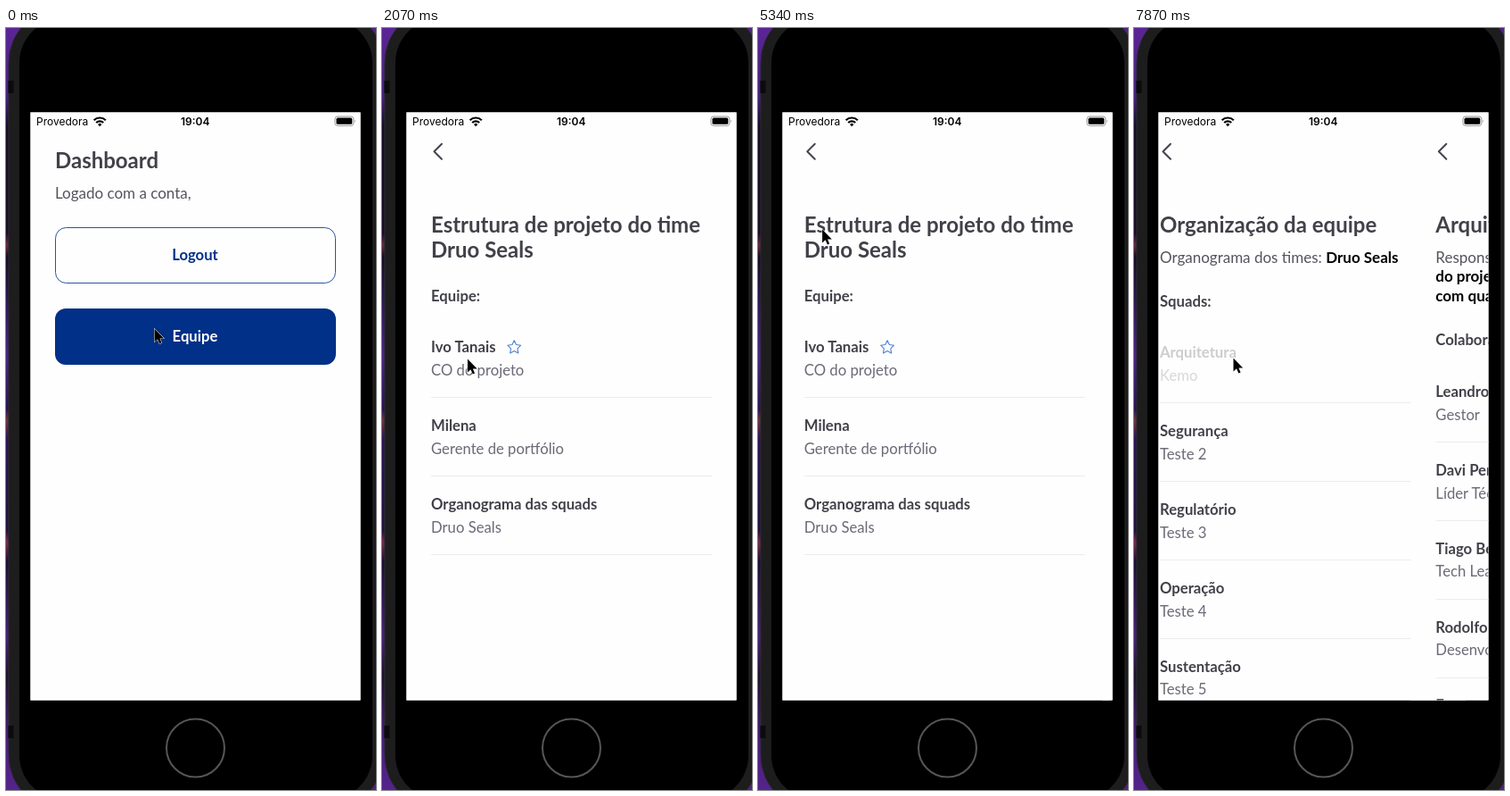
Recreate the animation shown at these times as an HTML page. Size 415 px wide and 853 px high, loop 8 s.

```html
<!DOCTYPE html>
<html lang="pt-BR">
<head>
<meta charset="utf-8">
<title>App em celular</title>
<style>
  html, body { margin: 0; width: 100%; height: 100%; overflow: hidden; background: #000; }
  svg { display: block; width: 100%; height: 100%; }
  text { font: 400 16.7px Lato, "Open Sans", sans-serif; fill: #6c6a77; }
  .h { font-size: 24px; font-weight: 700; fill: #434049; }
  .b { font-weight: 700; fill: #434049; }
  .p { font-size: 17px; fill: #55535f; }
  .k { fill: #000; }
  .kb { font-weight: 700; fill: #000; }
  .btn { font-weight: 700; fill: #003087; text-anchor: middle; }
  .bar { font: 400 12px Inter, Roboto, sans-serif; fill: #000; }
  .clock { font-weight: 600; text-anchor: middle; }
  .line { stroke: #ececee; }
  .chev { fill: none; stroke: #45434e; stroke-width: 2; stroke-linecap: round; stroke-linejoin: round; }
</style>
</head>
<body>
<svg id="stage" viewBox="0 0 415 853">
  <defs>
    <linearGradient id="desk" x2="0" y2="1">
      <stop offset="0" stop-color="#5b2596"/>
      <stop offset=".09" stop-color="#4a1f80"/>
      <stop offset=".13" stop-color="#170c26"/>
      <stop offset=".27" stop-color="#1b0d2a"/>
      <stop offset=".285" stop-color="#6b2a44"/>
      <stop offset=".3" stop-color="#160c24"/>
      <stop offset=".43" stop-color="#4b2488"/>
      <stop offset=".5" stop-color="#2a1350"/>
      <stop offset=".515" stop-color="#6d3340"/>
      <stop offset=".54" stop-color="#2c1452"/>
      <stop offset=".66" stop-color="#24103f"/>
      <stop offset=".675" stop-color="#7a2c4c"/>
      <stop offset=".7" stop-color="#1d0d33"/>
      <stop offset=".8" stop-color="#4a2078"/>
      <stop offset=".85" stop-color="#20102f"/>
      <stop offset=".94" stop-color="#4c1f80"/>
      <stop offset="1" stop-color="#54238c"/>
    </linearGradient>
    <clipPath id="glass"><rect x="27.5" y="94.5" width="370" height="658"/></clipPath>
  </defs>
  <rect width="415" height="853" fill="url(#desk)"/>
  <rect x="400" width="15" height="853" fill="#57218c"/>
  <rect x="3" y="-23" width="420" height="899" rx="62" fill="#1d1d1e" stroke="#2c2c2e"/>
  <path d="M2.5 59h6v14h-6zM2.5 781h6v14h-6z" fill="#0b0b0c"/>
  <rect x="15" y="-11" width="396" height="875" rx="50" fill="#000"/>
  <circle cx="212.5" cy="806" r="32.5" fill="none" stroke="#565656" stroke-width="2"/>
  <g clip-path="url(#glass)">
    <rect x="27" y="94" width="371" height="659" fill="#fefefe"/>
    <g id="screens"></g>
    <rect x="27" y="94" width="371" height="22" fill="#fefefe"/>
    <text class="bar" x="34" y="109">Provedora</text>
    <g fill="none" stroke="#000" stroke-width="2.2">
      <path d="M98.6 103.2a9.4 9.4 0 0 1 13.2 0M101.2 106a5.7 5.7 0 0 1 8 0"/>
      <path d="M105.2 110.2l-2.1-2.3a3 3 0 0 1 4.2 0z" fill="#000" stroke="none"/>
    </g>
    <text class="bar clock" x="212.3" y="109">19:04</text>
    <rect x="368.9" y="99" width="21" height="10.4" rx="3" fill="none" stroke="#9a9a9a"/>
    <rect x="370.5" y="100.6" width="17.8" height="7.2" rx="1.6"/>
    <path d="M391.2 102.4q1.6 1.8 0 3.6z" fill="#9a9a9a"/>
  </g>
  <path id="cursor" d="M0 0V15L3.5 11.8 5.8 17 8.1 16 5.9 10.9H10.7Z" stroke="#fff" stroke-width="1" stroke-linejoin="round" paint-order="stroke"/>
</svg>
<script>
const $ = id => document.getElementById(id);
const X = 55, WIDTH = 370, PARALLAX = 111, LOOP = 8000, TICK = 148.65;

const text = (y, cls, str, x = X) => `<text x="${x}" y="${y}" class="${cls}">${str}</text>`;
const line = y => `<path class="line" d="M${X} ${y}H370"/>`;
const pair = (label, value) => `<tspan class="b">${label}:</tspan> <tspan class="k">${value}</tspan>`;

function star(cx, cy) {
  const pts = Array.from({ length: 10 }, (_, i) => {
    const r = i % 2 ? 3.9 : 7.8, a = i * Math.PI / 5 - Math.PI / 2;
    return (cx + r * Math.cos(a)).toFixed(2) + ',' + (cy + r * Math.sin(a)).toFixed(2);
  });
  return `<polygon points="${pts.join(' ')}" fill="none" stroke="#4f82d4" stroke-width="1.1" stroke-linejoin="round"/>`;
}

// Two-line rows, 88px apart, each with a divider.
const rows = (id, top, list, extra = '') => list.map(([name, role], i) => {
  const y = top + i * 87.9;
  return `<g id="${id}${i}">${text(y, 'b', name)}${text(y + 25.8, '', role)}${i ? '' : extra}</g>` +
    line(Math.round(y + 50) + .5);
}).join('');

const screen = (id, body, back = true) => `<g id="${id}">
  <rect x="27" y="116" width="371" height="637" fill="#fefefe"/>
  ${back ? `<path id="${id}Back" class="chev" d="M67 129.7 58.5 138.2 67 146.7"/>` : ''}${body}</g>`;

const facts = [
  ['Projeto', 'Druo Seals'], ['Equipe', ''], ['Empresa', 'Druo'],
  ['Conhecimentos', 'Gerir times'], ['E-mail', 'ivo.tanais@druo.example'],
  ['Localização', 'São Paulo (Capital)'], ['Responsabilidades', 'Gestão de projetos']
];

$('screens').innerHTML =
  screen('home',
    text(156.5, 'h', 'Dashboard') + text(190.5, 'p', 'Logado com a conta,') +
    '<rect x="55.5" y="223.5" width="314" height="62" rx="12" fill="none" stroke="#2c53a0"/>' +
    text(259.5, 'btn', 'Logout', 212) +
    '<g id="homeBtn"><rect x="55" y="314" width="315" height="63" rx="12" fill="#003087"/>' +
    '<text class="btn" x="212" y="350.5" style="fill:#fff">Equipe</text></g>', false) +
  screen('team',
    text(229, 'h', 'Estrutura de projeto do time') + text(256.5, 'h', 'Druo Seals') +
    text(306, 'b', 'Equipe:') +
    rows('teamRow', 363, [['Ivo Tanais', 'CO do projeto'], ['Milena', 'Gerente de portfólio'],
      ['Organograma das squads', 'Druo Seals']], star(148.3, 357.6))) +
  screen('person',
    text(229, 'h', 'Ivo Tanais') + text(262.5, 'p', 'CO do projeto') +
    facts.map(([label, value], i) => {
      const y = 312 + i * 54.25;
      return text(y, '', pair(label, value)) + (value ? line(Math.round(y + 20.4) + .5) : '');
    }).join('')) +
  screen('squads',
    text(229, 'h', 'Organização da equipe') +
    text(262.5, 'p', 'Organograma dos times: <tspan class="kb">Druo Seals</tspan>') +
    text(312, 'b', 'Squads:') +
    rows('squadRow', 369, [['Arquitetura', 'Kemo'], ['Segurança', 'Teste 2'], ['Regulatório', 'Teste 3'],
      ['Operação', 'Teste 4'], ['Sustentação', 'Teste 5']])) +
  screen('arch',
    text(229, 'h', 'Arquitetura') + text(262.5, 'p', 'Responsável pelo desenho') +
    text(284.3, 'p kb', 'do projeto e por manter') + text(306, 'p kb', 'com qualidade a entrega') +
    text(355, 'b', 'Colaboradores:') +
    rows('archRow', 412.8, [['Leandro', 'Gestor'], ['Davi Pena', 'Líder Técnico'], ['Tiago Bento', 'Tech Lead'],
      ['Rodolfo', 'Desenvolvedor'], ['Enzo', 'Desenvolvedor']]));

// start, lower screen, upper screen, 1 = push / -1 = pop
const slides = [
  [839, 'home', 'team', 1], [2610, 'team', 'person', 1], [4960, 'team', 'person', -1],
  [6340, 'team', 'squads', 1], [7792, 'squads', 'arch', 1]
];
// element, touch down, touch up, dimmed opacity
const presses = [
  ['homeBtn', 860, 930, .2], ['teamRow0', 2500, 2650, .2], ['personBack', 4880, 5000, .45],
  ['teamRow2', 6070, 6400, .2], ['squadRow0', 7700, 7860, .2]
];
// time, x, y
const path = [
  [0, 166.5, 336.5], [140, 163, 343], [1338, 163, 343], [1487, 150, 351], [1635, 135, 360],
  [1784, 122, 366], [1932, 110, 368], [2075, 96, 370.5], [3270, 96, 370.5], [3419, 90, 310],
  [3567, 66, 185], [3710, 57, 133.5], [5200, 57, 133.5], [5351, 72, 225], [5500, 108, 430],
  [5640, 126.5, 532.5], [6690, 126.5, 532.5], [6838, 124, 500], [6986, 120, 445],
  [7135, 115, 400], [7284, 112, 378], [7425, 111.5, 369.5], [LOOP, 111.5, 369.5]
];

const clamp = v => Math.max(0, Math.min(1, v));

// cubic-bezier(.25, .1, .25, 1)
function ease(x) {
  let lo = 0, hi = 1;
  const curve = (u, a, b) => 3 * (1 - u) ** 2 * u * a + 3 * (1 - u) * u * u * b + u ** 3;
  for (let i = 0; i < 20; i++) {
    const mid = (lo + hi) / 2;
    if (curve(mid, .25, .25) < x) lo = mid; else hi = mid;
  }
  return curve(hi, .1, 1);
}

function place(id, pos) {
  const el = $(id);
  el.style.display = Math.abs(pos) > .9995 ? 'none' : '';
  el.setAttribute('transform', `translate(${(pos * (pos < 0 ? PARALLAX : WIDTH)).toFixed(2)} 0)`);
}

function draw(t) {
  const [start, low, high, dir] = slides.filter(s => s[0] <= t).pop() || slides[0];
  const p = ease(clamp((t - start) / 500));
  const shown = dir > 0 ? p : 1 - p;
  for (const id of ['home', 'team', 'person', 'squads', 'arch'])
    place(id, id === low ? -shown : id === high ? 1 - shown : 1);

  for (const [id, down, up, dim] of presses)
    $(id).setAttribute('opacity', t < down ? 1 : dim + (1 - dim) * clamp((t - up) / 250));

  const i = Math.max(1, path.findIndex(k => k[0] > t));
  const [t0, x0, y0] = path[i - 1], [t1, x1, y1] = path[i];
  const q = clamp((t - t0) / (t1 - t0));
  $('cursor').setAttribute('transform', `translate(${x0 + (x1 - x0) * q} ${y0 + (y1 - y0) * q})`);
}

const begin = performance.now();
function loop() {
  const t = (performance.now() - begin) % LOOP;
  draw(Math.floor((t + 19) / TICK) * TICK);
  requestAnimationFrame(loop);
}
loop();
</script>
</body>
</html>
```
